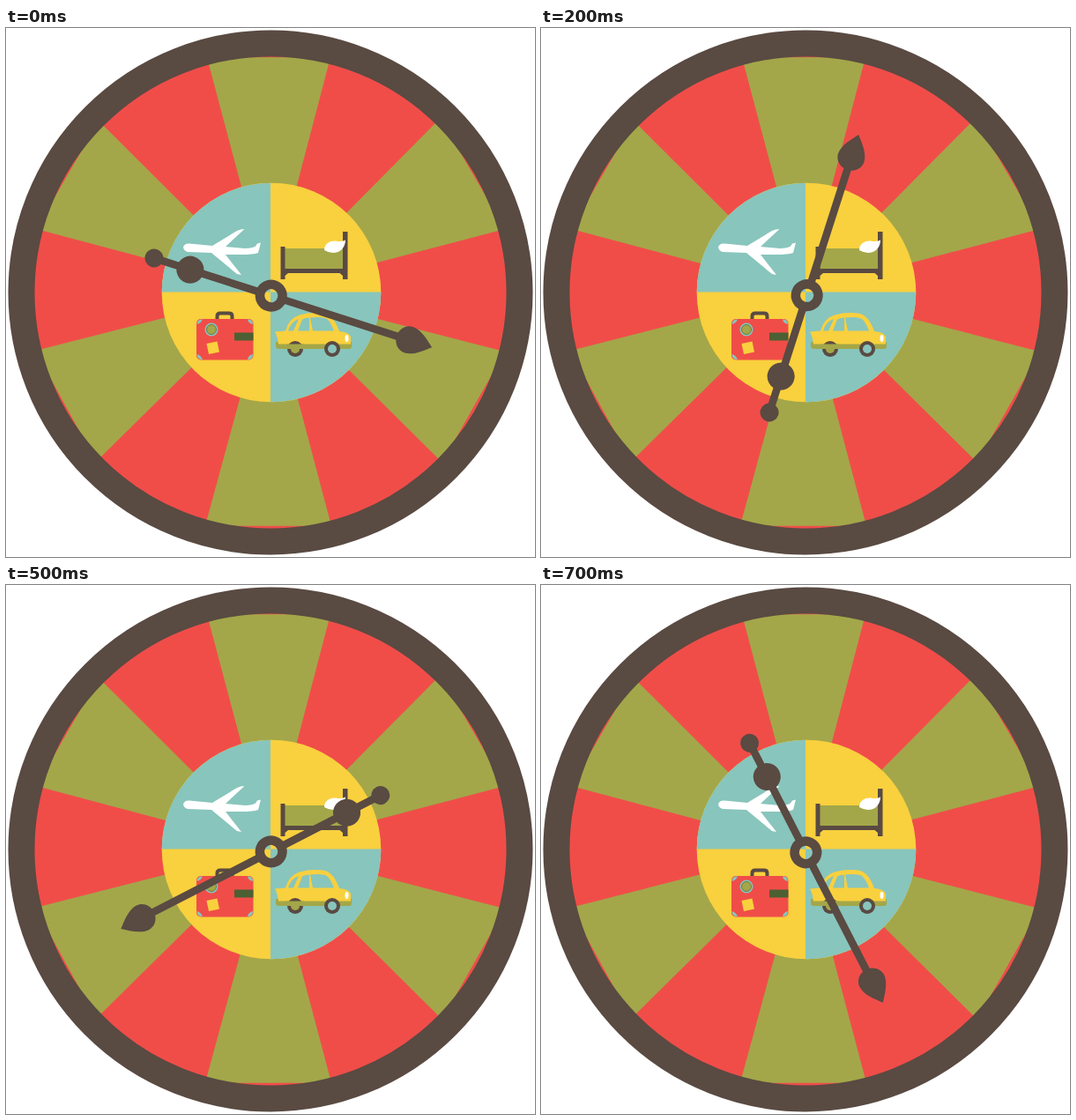
These frames come from a looping animation (600 by 600 pixels, 800 ms). An HTML page:

```html
<!DOCTYPE html>
<html lang="en">
<head>
<meta charset="utf-8">
<title>Travel spinner</title>
<style>
  html, body { margin: 0; width: 100%; height: 100%; overflow: hidden; background: #fff; }
  svg { display: block; width: 100vw; height: 100vh; }
  .brown { fill: #594a42; } .red { fill: #f04d49; } .green { fill: #a3a749; }
  .teal { fill: #88c5bc; } .yellow { fill: #f9d03e; } .white { fill: #fff; }
  .line { fill: none; stroke: #594a42; }
</style>
</head>
<body>
<svg viewBox="0 0 600 600">
  <circle class="red" cx="300" cy="300" r="275"/>
  <path id="wedges" class="green"/>
  <circle class="line" cx="300" cy="300" r="282.5" stroke-width="30"/>

  <circle class="yellow" cx="301" cy="300" r="124.3"/>
  <path class="teal" d="M300 299.5V175.7A124.3 124.3 0 0 0 176.7 299.5ZM300 299.5V424.3A124.3 124.3 0 0 0 425.3 299.5Z"/>

  <g id="plane" class="white">
    <path d="M201 249Q202 244 208 244.500L234 247L262 230Q266 228 270.500 228L249 248L271 250Q280 249.500 283 247.500L285 244.500L289 243.500L286 255Q280 257 266 257H249L267 280L262 279L233 255L206 254Q202 253 201 249Z"/>
  </g>

  <g id="bed">
    <path class="green" d="M316 250H382V274H316Z"/>
    <path class="brown" d="M311.500 248H316.500V273H382V231H387.500V285H382V281L378.500 278H320L316.500 281V285H311.500Z"/>
    <path class="white" d="M361 252C361 244 368 241 374 241.500Q380 243 385 240.500C385 249 379 255 371 255Q366 255 361 252Z"/>
  </g>

  <g id="case">
    <path class="line" stroke-width="4" d="M239.500 331V327Q239.500 323.500 243 323.500H253Q256.500 323.500 256.500 327V331"/>
    <rect class="red" x="216" y="330" width="64.500" height="46.500" rx="5"/>
    <path class="teal" d="M216.500 336Q221 335 223 330.500Q217 330 216.500 336ZM274 330.500Q275 335 280 336Q280 330 274 330.500ZM216.500 370Q221 371 223 376Q217 376.500 216.500 370ZM274 376Q275 371 280 370Q280 376.500 274 376Z"/>
    <circle class="teal" cx="233" cy="342" r="7.500"/>
    <circle cx="233" cy="342" r="5.500" fill="#a3a749" stroke="#6f7a45"/>
    <path class="yellow" d="M227.500 358L239.500 355.500L242 367.500L230 370Z"/>
    <path fill="#4c6033" d="M259 345.500H280.500V354.500H259Z"/>
  </g>

  <g id="car">
    <path class="green" d="M306 356H392V361Q392 364 389 364H310Q306 364 306 361Z"/>
    <path class="yellow" d="M305 344.500L317 343.500Q321 329 333 325.500Q348 321.500 362 324Q372 327 378 344Q389 345 391 350V358.500H309Q308 350 305 344.500Z"/>
    <path class="teal" d="M320 343.500Q323 333 332 330L326 343.500ZM331 343.500L336 330.500Q340 328.500 344 328.500V343.500ZM348 343.500L345 328.500Q359 327 364 330Q368 333 372 343.500Z"/>
    <circle class="brown" cx="328" cy="364" r="9"/>
    <path class="green" d="M318 358.500H338V364H318Z"/>
    <circle class="green" cx="328" cy="364" r="5"/>
    <circle class="brown" cx="370" cy="364" r="9"/>
    <circle class="teal" cx="370" cy="364" r="5"/>
    <ellipse class="white" cx="386.500" cy="352" rx="2" ry="4"/>
  </g>

  <g id="pointer" class="brown">
    <path d="M-140 -4.300H-10V4.300H-140ZM10 -4.300H155V4.300H10Z"/>
    <circle cx="-139.500" r="10.500"/>
    <circle cx="-96.500" r="15.500"/>
    <path d="M149.500 0C149.500 -9 156 -15.500 164 -15.500C175 -15 184 -6 191.500 0C184 6 175 15 164 15.500C156 15.500 149.500 9 149.500 0Z"/>
    <circle class="line" r="12.800" stroke-width="10.500"/>
  </g>
</svg>
<script>
const $ = id => document.getElementById(id);

// Rim points of the green wedges, each pair joined to the hub
const hub = [298.5, 298.3];
const rims = [
  [230, 41, 366, 41], [487, 108, 558, 230], [558, 365, 489, 487],
  [367, 557, 228, 557], [108, 486, 41, 364], [42, 230, 111, 111]
];
const push = (v, i) => hub[i % 2] + (v - hub[i % 2]) * 1.03;
$('wedges').setAttribute('d', rims.map(r => `M${hub}L${r.map(push)}Z`).join(''));

// The pointer jumps an eighth of a turn anticlockwise every 100 ms
function draw(now) {
  const step = Math.floor(now / 100) % 8;
  $('pointer').setAttribute('transform', `translate(301 303) rotate(${17.8 - 45 * step}) translate(0 .7)`);
  requestAnimationFrame(draw);
}
draw(performance.now());
</script>
</body>
</html>
```
